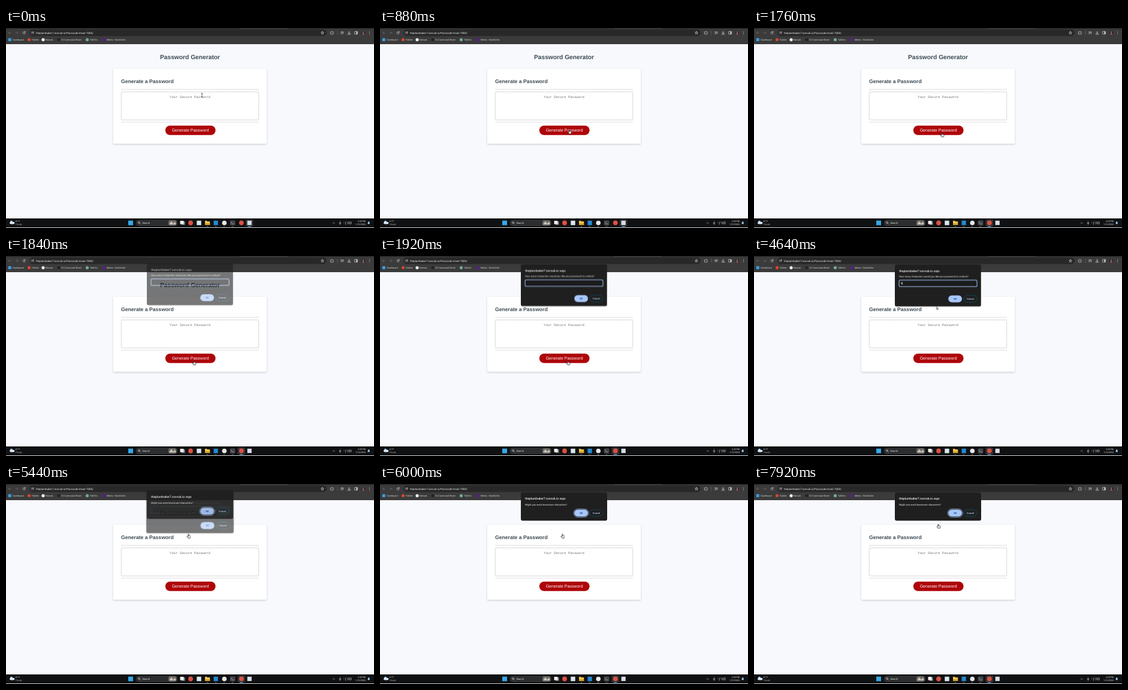
These frames come from a looping animation (614 by 334 pixels, 8 s). An HTML page:

```html
<!DOCTYPE html>
<html lang="en">
<head>
<meta charset="utf-8">
<title>Password Generator</title>
<style>
  html, body { margin: 0; width: 100%; height: 100%; overflow: hidden; background: #f7f9fc; }
  svg { display: block; width: 614px; height: 334px; }
  text { font-family: Roboto, sans-serif; text-rendering: geometricPrecision; }
  .page text { font-family: "Liberation Sans", Arial, sans-serif; fill: #3b4a54; }
  .page .mono { font: 5.67px "Liberation Mono", monospace; fill: #757575; }
  .page .label { font-size: 7px; fill: #fff; }
  .bold { font-weight: 700; }
  .marks text { font-size: 3.84px; fill: #d6d6d6; }
  .tray text { font-size: 3.6px; fill: #e6e6e6; }
  .line { fill: none; stroke: #d0d0d0; stroke-width: .7; stroke-linecap: round; stroke-linejoin: round; }
  .dim { stroke: #6c6c6c; }
  .end { text-anchor: end; }
  .mid { text-anchor: middle; }

  .ask { font-size: 4.12px; fill: #f4f4f4; }
  .says { font-size: 5px; font-weight: 500; fill: #f4f4f4; }
  .ok, .cancel { font-size: 4px; font-weight: 500; }
  .ok { fill: #0b3573; }
  .cancel { fill: #b4d0fc; }

  /* 1% of the loop is 80 ms */
  .anim { animation: 8s step-end infinite; }
  .dialog { opacity: 0; transform-origin: 307px 49px; }
  #ask { animation-name: ask; }
  #lower { animation-name: lower; }
  #digit { animation-name: digit; }
  #caret { animation-name: caret; }
  #recorder { animation-name: recorder; }
  #browser { animation-name: browser; }
  #cursor { animation-name: move; }
  #beam { animation-name: beam; }
  #arrow { animation-name: arrow; }
  #hand { animation-name: hand; }

  @keyframes ask {
    0% { opacity: 0; transform: none; }
    23% { opacity: .6; transform: translateY(-2px); }
    24% { opacity: 1; transform: translateY(-.5px); }
    25% { opacity: 1; transform: none; }
    67% { opacity: .88; transform: translateY(-1px) scale(1.005); }
    68% { opacity: .6; transform: translateY(-2.6px) scale(1.014); }
    69% { opacity: .2; transform: translateY(-3.4px) scale(1.018); }
    70%, 100% { opacity: 0; transform: none; }
  }
  @keyframes lower {
    0% { opacity: 0; transform: none; }
    67% { opacity: .4; transform: translateY(-5px); }
    68% { opacity: .84; transform: translateY(-3px); }
    69% { opacity: .96; transform: translateY(-1px); }
    70%, 100% { opacity: 1; transform: none; }
  }
  @keyframes digit { 0% { opacity: 0; } 58%, 100% { opacity: 1; } }
  @keyframes caret { 0% { opacity: 0; } 58% { opacity: 1; } 65%, 100% { opacity: 0; } }
  @keyframes recorder { 0% { opacity: 1; } 19%, 100% { opacity: 0; } }
  @keyframes browser { 0% { opacity: 0; } 19%, 100% { opacity: 1; } }
  @keyframes move {
    0% { transform: translate(327px, 112px); }
    1% { transform: translate(327px, 112px); animation-timing-function: steps(11, start); }
    12% { transform: translate(316px, 170px); animation-timing-function: steps(6, start); }
    18% { transform: translate(313.5px, 175px); }
    27% { transform: translate(313.5px, 175px); animation-timing-function: steps(6, start); }
    33% { transform: translate(304.5px, 83.5px); }
    97% { transform: translate(307px, 81px); }
    98% { transform: translate(312px, 74px); }
    99%, 100% { transform: translate(307.5px, 67px); }
  }
  @keyframes beam { 0% { opacity: 1; } 8%, 100% { opacity: 0; } }
  @keyframes arrow { 0% { opacity: 0; } 8% { opacity: 1; } 10% { opacity: 0; } 27% { opacity: 1; } 67%, 100% { opacity: 0; } }
  @keyframes hand { 0% { opacity: 0; } 10% { opacity: 1; } 27% { opacity: 0; } 67%, 100% { opacity: 1; } }
</style>
</head>
<body>
<svg viewBox="0 0 614 334" xmlns="http://www.w3.org/2000/svg">
  <defs>
    <filter id="soft" x="-10%" y="-10%" width="120%" height="125%"><feGaussianBlur stdDeviation="1.5"/></filter>
    <g id="cancel-button">
      <rect x="350" y="-5.6" width="22" height="11.2" rx="5.6" fill="none" stroke="#0d5266" stroke-width=".8"/>
      <text class="cancel mid" x="361" y="1.4">Cancel</text>
    </g>
    <g id="ok-button">
      <rect x="324.2" y="-5.8" width="22.8" height="11.6" rx="5.8" fill="#a8c7fa"/>
      <text class="ok mid" x="335.6" y="1.4">OK</text>
    </g>
  </defs>

  <g class="page">
    <rect width="614" height="334" fill="#f7f9fc"/>
    <text class="bold mid" x="307" y="52.2" font-size="10.24">Password Generator</text>
    <rect x="179" y="69" width="256" height="125.5" rx="1.5" fill="#9aa5b1" opacity=".5" filter="url(#soft)"/>
    <rect x="179" y="68" width="256" height="125.2" rx="1.5" fill="#fff"/>
    <text class="bold" x="192" y="92.4" font-size="8.65">Generate a Password</text>
    <path d="M192 102.4H422M192 157.2H422" stroke="#d3d6da" stroke-width=".8"/>
    <rect x="192.3" y="106.8" width="229.4" height="46.8" rx="1.5" fill="#fff" stroke="#b4b4b4" stroke-width=".8" stroke-dasharray="1.9 1"/>
    <text class="mono mid" x="307" y="117">Your Secure Password</text>
    <rect x="265.8" y="163" width="83.8" height="15.8" rx="7.9" fill="#ae0509"/>
    <text class="label mid" x="307.6" y="173.2">Generate Password</text>
  </g>

  <g class="toolbar">
    <rect width="614" height="27" fill="#3b3b3b"/>
    <rect width="614" height="1.2" fill="#222"/>
    <rect x="390" width="80" height="1.2" fill="#3b3b3b"/>
    <rect x="39" y="2.4" width="496" height="11" rx="5.5" fill="#282828"/>
    <g class="line">
      <path class="dim" d="M8 8H4.5M6 6.3L4.4 8L6 9.7M16.5 8H20M18.5 6.3L20.1 8L18.5 9.7"/>
      <path d="M31.6 6.9A1.9 1.9 0 1 0 32 8.6M32 5.6V7.2H30.4"/>
      <path d="M42 7H44.4M42 9.2H43M44.4 9.2H46"/><circle cx="45.4" cy="7" r=".7"/>
      <path d="M528 5.7L528.7 7.3L530.4 7.4L529.1 8.6L529.5 10.2L528 9.3L526.5 10.2L526.9 8.6L525.6 7.4L527.3 7.3Z"/>
      <path d="M541.8 6.5H543.2A.8 .8 0 0 1 544.8 6.5H546V10.2H541.8Z"/>
      <path class="dim" d="M553 5V11"/>
      <path d="M558.8 6.5H563M558.8 8H561.5M558.8 9.5H560.5M562.7 9.7V7.3"/>
      <path d="M572.5 5.5V9M571 7.6L572.5 9L574 7.6M570.4 9.4V10.6H574.6V9.4"/>
      <rect x="582" y="5.8" width="4.2" height="4.4"/>
    </g>
    <rect x="584.5" y="5.8" width="1.8" height="4.4" fill="#ddd"/>
    <circle cx="596" cy="8" r="3" fill="#2b2427"/>
    <path d="M593.9 10.1A2.2 2.2 0 0 1 598.1 10.1A3 3 0 0 1 593.9 10.1" fill="#a4605c"/>
    <circle cx="596" cy="7" r="1.1" fill="#b58e80"/>
    <path d="M606.5 6.1V6.11M606.5 8V8.01M606.5 9.9V9.91" stroke="#c8c8c8" stroke-linecap="round"/>
    <text x="50" y="9.6" font-size="4.45" fill="#ececec">theplumbaker7.norvub.io/Passcode-mixer-7000/</text>
  </g>

  <g class="marks">
    <rect x="3.8" y="17" width="5" height="5" fill="#3d9be0"/>
    <circle cx="38.5" cy="19.6" r="2.5" fill="#e2452b"/>
    <circle cx="62" cy="19.6" r="2.6" fill="#f0f0f0"/>
    <circle cx="88" cy="19.6" r="2.5" fill="#232323"/>
    <circle cx="135.5" cy="19.6" r="2.6" fill="#74aa9c"/>
    <rect x="160.8" y="17.2" width="4.8" height="4.8" fill="#55208f"/>
    <text x="11.2" y="21">Dashboard</text>
    <text x="43" y="21">Fobble</text>
    <text x="66" y="21">Norvub</text>
    <text x="92" y="21">Cli Command Sheet</text>
    <text x="140" y="21">TalkVlo</text>
    <text x="168" y="21">Media - DeskVoller</text>
  </g>

  <g class="tray">
    <rect y="318" width="614" height="15" fill="#101113"/>
    <rect y="333" width="614" height="1" fill="#d4d6d8"/>
    <circle cx="9" cy="323.8" r="2" fill="#b8d4f2"/>
    <rect x="6" y="323.7" width="8.4" height="3.7" rx="1.8" fill="#dbe9f8"/>
    <text x="15.5" y="324.2">41°F</text>
    <text x="15.5" y="329.2" style="fill:#b4b4b4">Cloudy</text>

    <rect x="204" y="321.7" width="8" height="7.6" fill="#36a9e8"/>
    <rect x="216.5" y="320" width="69.5" height="11" rx="5.5" fill="#2c2d2f"/>
    <circle class="line" cx="221.8" cy="324.9" r="1.5"/>
    <path class="line" d="M222.9 326L224.3 327.5"/>
    <text x="227.3" y="327" style="font-size:4.2px">Search</text>
    <rect x="271" y="321.2" width="13.5" height="8.6" rx="3" fill="#6d6a66"/>
    <path d="M272 328L276 322.5L279 327L281.5 323.5L284 328Z" fill="#c9c3b8"/>
    <rect x="292.5" y="323.2" width="6" height="5.5" fill="#8c8c8c"/>
    <rect x="290.5" y="322" width="6" height="5.5" fill="#eee"/>

    <g id="browser" class="anim">
      <rect x="386.5" y="319.5" width="12.5" height="12" rx="1.5" fill="#303134"/>
      <rect x="390" y="331" width="5.5" height="1" rx=".5" fill="#7cc4f5"/>
    </g>
    <g id="recorder" class="anim">
      <rect x="400" y="319.5" width="12.5" height="12" rx="1.5" fill="#303134"/>
      <rect x="403.5" y="331" width="5.5" height="1" rx=".5" fill="#7cc4f5"/>
    </g>
    <path d="M334.7 331.5H337.3M348.7 331.5H351.3M362.7 331.5H365.3M376.7 331.5H379.3" stroke="#888" stroke-width=".8"/>
    <circle cx="308" cy="325.5" r="3.9" fill="#dc5143"/>
    <rect x="318.3" y="321.8" width="7.4" height="7.4" fill="#d9e7ee"/>
    <path d="M332 322H335L336 323H340.2V329H332Z" fill="#f2c548"/>
    <path d="M332 326H340.2V329H332Z" fill="#d9a62b"/>
    <rect x="346.5" y="321.8" width="7.2" height="7.4" fill="#2489d5"/>
    <circle cx="364.3" cy="325.5" r="3.8" fill="#e6e6e6"/>
    <rect x="374.3" y="322" width="7.6" height="7" rx=".8" fill="#3c4044" stroke="#777" stroke-width=".5"/>
    <path class="line" d="M375.7 324L377 325.3L375.7 326.6M378 327H380"/>
    <circle cx="392.8" cy="325.3" r="3.9" fill="#dc5143"/>
    <rect x="402.6" y="321.8" width="7.2" height="7.2" fill="#d8dde6"/>

    <g class="line">
      <path d="M545.3 326.2L546.8 324.7L548.3 326.2"/>
      <path d="M557.5 323V325.4M555.9 325.3A1.6 1.6 0 0 0 559.1 325.3M557.5 327V328.2"/>
      <path d="M563.5 325H564.3M567.3 323.5L566.4 328M570.5 323.7V327.4M573 324H576V327H573Z"/>
    </g>
    <text class="end" x="600" y="324.2">4:35 PM</text>
    <text class="end" x="600" y="329.2">1/10/2024</text>
    <path d="M603.2 327.2L603.8 326V324.7A1.4 1.4 0 0 1 606.6 324.7V326L607.2 327.2Z" fill="#9bd0f2"/>
  </g>

  <g id="ask" class="dialog anim">
    <rect x="235" y="14.2" width="144" height="70" rx="3" fill="#1f1f1f"/>
    <text class="says" x="242" y="26.4">theplumbaker7.norvub.io says</text>
    <text class="ask" x="242" y="35.6">How many characters would you like your password to contain?</text>
    <rect x="242" y="40.2" width="130" height="10.8" rx="2" fill="#1b1b1d" stroke="#a8c7fa"/>
    <text id="digit" class="ask anim" x="244.9" y="47">8</text>
    <path id="caret" class="anim" d="M247.6 43.2V47.9" stroke="#f4f4f4" stroke-width=".6"/>
    <use href="#ok-button" y="71.5"/>
    <use href="#cancel-button" y="71.5"/>
  </g>

  <g id="lower" class="dialog anim">
    <rect x="235" y="14.2" width="144" height="47" rx="3" fill="#1f1f1f"/>
    <text class="says" x="242" y="26.4">theplumbaker7.norvub.io says</text>
    <text class="ask" x="242" y="35.6">Might you want lowercase characters?</text>
    <rect x="323" y="41.6" width="25.2" height="13.8" rx="6.9" fill="none" stroke="#a8c7fa" stroke-width=".7"/>
    <use href="#ok-button" y="48.5"/>
    <use href="#cancel-button" y="48.5"/>
  </g>

  <g id="cursor" class="anim">
    <path id="beam" class="anim" d="M-1.4 -2.8H1.4M0 -2.8V2.8M-1.4 2.8H1.4" fill="none" stroke="#222" stroke-width=".7"/>
    <path id="arrow" class="anim" d="M0 1.2V5.6L1.1 4.6L1.8 6.2L2.5 5.8L1.8 4.3H3.1Z" fill="#fff" stroke="#111" stroke-width=".6"/>
    <path id="hand" class="anim" d="M-.6 .5Q0 -.3 .6 .5V2.5L2.9 3Q3.5 3.2 3.4 4L2.9 6.8H-.5L-2.3 4.4Q-2.2 3.5 -1.3 3.8L-.6 4.4Z" fill="#fff" stroke="#111" stroke-width=".75" stroke-linejoin="round"/>
  </g>
</svg>
</body>
</html>
```
